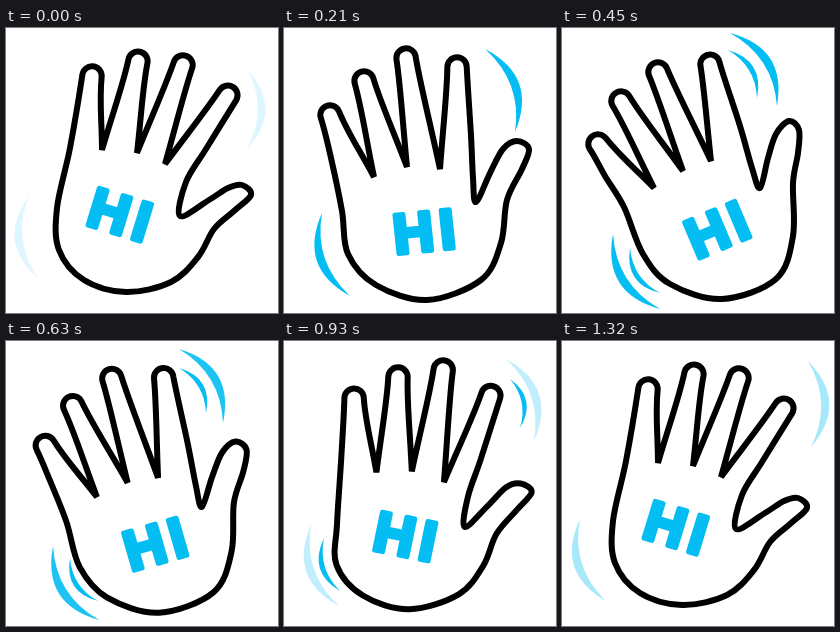
Write an HTML page that moves like this. It is 272x285 px and loops after 1.35 s.

```html
<!DOCTYPE html>
<html lang="en">
<head>
<meta charset="utf-8">
<title>Waving hand</title>
<style>
  html, body { margin: 0; width: 100%; height: 100%; overflow: hidden; background: #fff; }
  svg { display: block; width: 100vw; height: 100vh; }
  #hand { fill: none; stroke: #000; stroke-width: 6; stroke-linejoin: bevel; }
  .arc { fill: #04bdf2; }
  text {
    font: bold 56px "Liberation Sans", Arial, sans-serif;
    letter-spacing: 6px;
    text-anchor: middle;
    fill: #04bdf2; stroke: #04bdf2; stroke-width: 5; stroke-linejoin: round;
  }
</style>
</head>
<body>
<svg viewBox="0 0 272 285">
  <g id="arcs"></g>
  <path id="hand"/>
  <text id="hi" x="3" y="20">HI</text>
</svg>
<script>
const LOOP = 1350, STEP = 30, MID = 0.69, R = 9.7;

// Each pose: 4 fingertip centres, 3 gaps between fingers, then thumb and palm clockwise.
const poses = [
  [86,48, 132,33, 177,37, 222,67,  96,122, 131,125, 159,136,
   200,121, 180,154, 174,188, 203,172, 222,160, 236,157, 245,167, 228,183,
   208,201, 192,229, 165,254, 120,264, 78,252, 53,222, 51,180, 64,120],
  [46,87, 80,53, 122,30, 173,39,  90,149, 123,139, 156,141,
   187,108, 189,150, 192,174, 206,145, 219,121, 233,113, 245,121, 238,141,
   223,172, 217,215, 197,252, 143,272, 92,257, 64,226, 58,183, 47,130],
  [36,116, 59,73, 96,44, 148,36,  92,160, 121,143, 149,133,
   178,98, 190,140, 198,160, 206,130, 214,106, 227,93, 237,102, 236,125,
   231,155, 231,208, 214,251, 160,271, 108,256, 81,226, 62,179, 43,148]
];
// x, y, angle of the lettering in each pose
const labels = [[114,186,17], [140,203,-6], [155,201,-23]];

// time, opacity, right arc ends, left arc ends
const outer = [
  [0, .13, 242,42, 240,122, 32,250, 23,168],
  [210, 1, 201,21, 231,104, 66,268, 38,185],
  [450, 1, 168,5, 215,78, 98,281, 51,206],
  [630, .9, 173,8, 217,82, 93,279, 47,205],
  [780, .5, 195,10, 231,90, 75,271, 40,195],
  [930, .25, 222,18, 250,100, 55,265, 27,184],
  [1080, 0, 236,28, 258,108, 42,258, 15,175]
];
const inner = [
  [210, 0, 200,38, 218,90, 66,250, 50,196],
  [450, 1, 166,22, 195,70, 98,265, 68,220],
  [630, 1, 173,27, 200,72, 92,260, 64,217],
  [780, 1, 201,32, 214,80, 75,257, 52,205],
  [930, 1, 226,38, 236,87, 56,250, 40,197],
  [1080, .75, 238,34, 243,94, 50,253, 30,190],
  [1320, .35, 246,20, 249,106, 44,260, 18,178]
];

const $ = id => document.getElementById(id);
const add = (a, b, k = 1) => [a[0] + b[0] * k, a[1] + b[1] * k];
const sub = (a, b) => add(a, b, -1);
const mix = (a, b, k) => add(a, sub(b, a), k);
const str = (...pts) => pts.map(p => p.map(n => n.toFixed(2)).join(" ")).join(" ");

// Tilt of the hand: 0 leans right, 1 leans left
function tilt(t) {
  if (t < 450) return 1 - (1 - t / 450) ** 1.86;
  if (t < 540) return 1;
  if (t >= 1080) return 0;
  const x = (t - 540) / 540;
  return 1 - (x + (1 - Math.cos(Math.PI * x)) / 2) / 2;
}

// Quadratic blend through the three poses
function blend(set, u) {
  const w = [
    (u - MID) * (u - 1) / MID,
    u * (u - 1) / (MID * (MID - 1)),
    u * (u - MID) / (1 - MID)
  ];
  return set[0].map((_, i) => w.reduce((s, k, j) => s + k * set[j][i], 0));
}

function handPath(nums) {
  const pts = [];
  for (let i = 0; i < nums.length; i += 2) pts.push([nums[i], nums[i + 1]]);
  const tips = pts.slice(0, 4), gaps = pts.slice(4, 7), palm = pts.slice(7);
  const bases = [
    mix(gaps[0], gaps[1], -0.5), mix(gaps[0], gaps[1], 0.5),
    mix(gaps[1], gaps[2], 0.5), mix(gaps[2], gaps[1], -0.5)
  ];
  const fingers = tips.map((c, i) => {
    const d = sub(c, bases[i]), len = Math.hypot(...d);
    const axis = [d[0] / len, d[1] / len], side = [-axis[1], axis[0]];
    return { axis, l: add(c, side, -R), r: add(c, side, R) };
  });

  let d = "M" + str(fingers[0].l);
  fingers.forEach(({ axis, l, r }, i) => {
    if (i) d += "C" + str(mix(gaps[i - 1], l, 0.4), add(l, axis, -24), l);
    d += `A${R} ${R} 0 0 1 ` + str(r);
    if (i < 3) d += "C" + str(add(r, axis, -24), mix(gaps[i], r, 0.4), gaps[i]);
  });

  const first = fingers[0], last = fingers[3];
  const p = [add(last.r, last.axis, 25), last.r, ...palm, first.l, add(first.l, first.axis, 25)];
  for (let i = 1; i < p.length - 2; i++) {
    d += "C" + str(
      add(p[i], sub(p[i + 1], p[i - 1]), 1 / 6),
      add(p[i + 1], sub(p[i + 2], p[i]), -1 / 6),
      p[i + 1]);
  }
  return d + "Z";
}

// Arcs follow the tilt while the hand moves, and time while it rests
function sample(keys, t) {
  const n = keys.findIndex(k => k[0] > t);
  if (n < 0) return keys[keys.length - 1];
  if (n === 0) return keys[0];
  const a = keys[n - 1], b = keys[n];
  const ua = tilt(a[0]), ub = tilt(b[0]);
  const f = ua === ub ? (t - a[0]) / (b[0] - a[0]) : (tilt(t) - ua) / (ub - ua);
  return a.map((v, i) => v + (b[i] - v) * f);
}

function crescent(x0, y0, x1, y1) {
  const mid = [(x0 + x1) / 2, (y0 + y1) / 2], normal = [y1 - y0, x0 - x1];
  return "M" + str([x0, y0]) + "Q" + str(add(mid, normal, 0.46), [x1, y1]) +
    "Q" + str(add(mid, normal, 0.27), [x0, y0]) + "Z";
}

const arcs = [outer, inner].map(keys => {
  const el = document.createElementNS("http://www.w3.org/2000/svg", "path");
  el.setAttribute("class", "arc");
  $("arcs").append(el);
  return { el, keys };
});

function draw(t) {
  const u = tilt(t);
  $("hand").setAttribute("d", handPath(blend(poses, u)));
  const [x, y, angle] = blend(labels, u);
  $("hi").setAttribute("transform", `translate(${x} ${y}) rotate(${angle})`);
  for (const { el, keys } of arcs) {
    const [, opacity, ...ends] = sample(keys, t);
    el.setAttribute("d", crescent(...ends.slice(0, 4)) + crescent(...ends.slice(4)));
    el.setAttribute("opacity", opacity);
  }
}

const start = performance.now();
function tick() {
  const t = (performance.now() - start) % LOOP;
  draw(Math.floor(t / STEP) * STEP);
  requestAnimationFrame(tick);
}
tick();
</script>
</body>
</html>
```
